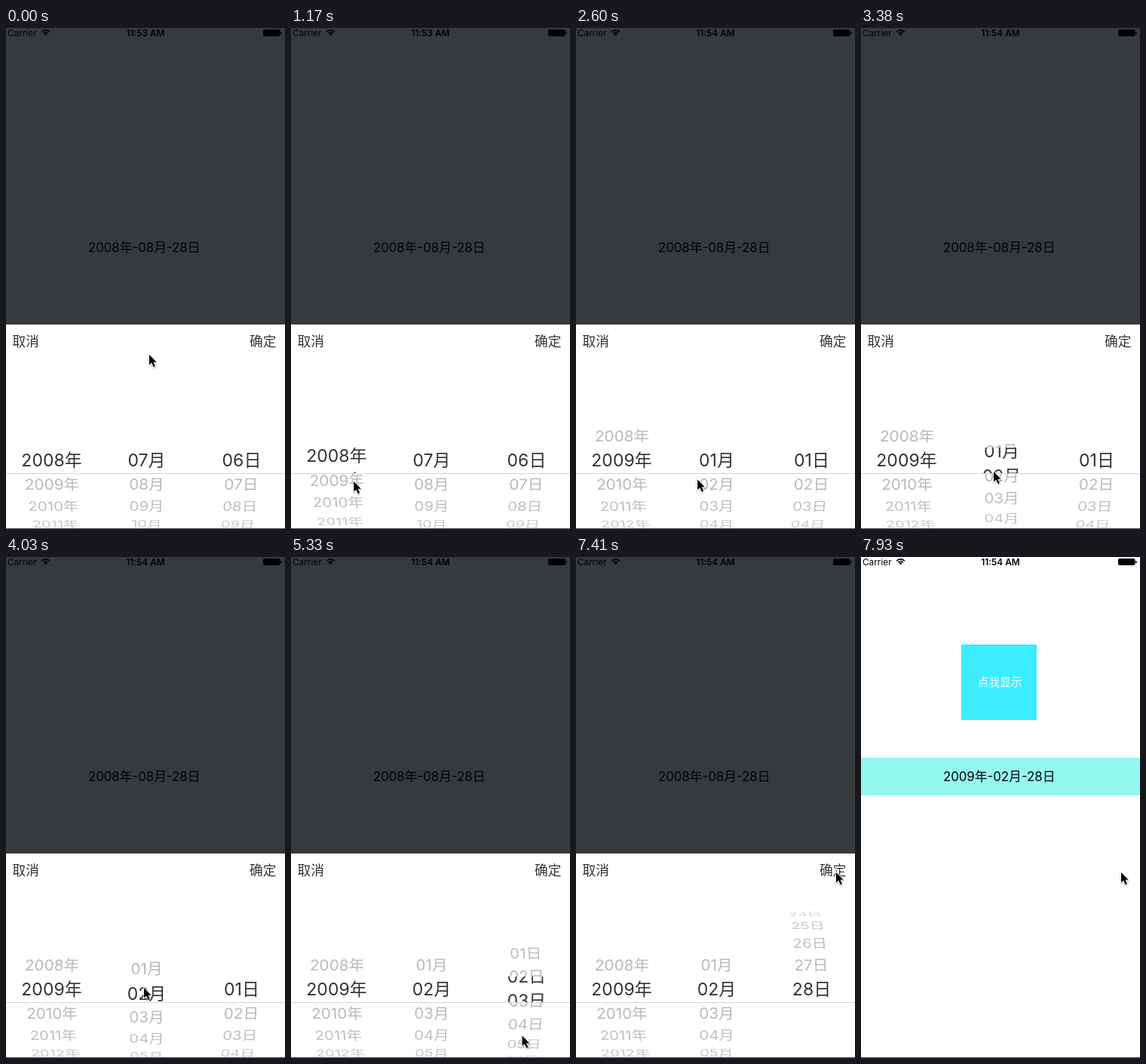
Write an HTML page with a canvas that moves like this. It is 370 px wide and 664 px high and loops after 8 s.

```html
<!DOCTYPE html>
<html lang="zh-CN">
<head>
<meta charset="utf-8">
<title>Date picker</title>
<style>
  html, body { margin: 0; width: 100%; height: 100%; overflow: hidden; background: #fff; }
  canvas { display: block; width: 370px; height: 664px; }
</style>
</head>
<body>
<canvas id="stage"></canvas>
<script>
const W = 370, H = 664, LOOP = 8000, STEP = 130;
const FONT = 'Inter, "Noto Sans CJK SC", "Noto Sans CJK", "Noto Sans CJK JP", sans-serif';
const canvas = document.getElementById('stage');
const ctx = canvas.getContext('2d');
const ratio = window.devicePixelRatio || 1;
canvas.width = W * ratio;
canvas.height = H * ratio;

// Wheel geometry: rows sit on a cylinder seen from the middle of the sheet
const MIDDLE_X = 186, CENTER_Y = 573, RADIUS = 106, ROW_ANGLE = 17.6 * Math.PI / 180;
const DEPTH = 0.1, REACH = 4.8;
const BAND_TOP = 556, BAND_HEIGHT = 34, SHEET_TOP = 393;

const RESET_AT = 2340, CLOCK_AT = 2210, CONFIRM_AT = 7800;

const pad = n => String(n).padStart(2, '0');
const smooth = u => u * u * (3 - 2 * u);

// Eased progress from 0 to 1 between two times
const progress = (t, start, end) =>
  smooth(Math.min(1, Math.max(0, (t - start) / (end - start))));

// Moves a value through successive eased legs
function glide(t, value, ...legs) {
  for (const [start, end, target] of legs) value += (target - value) * progress(t, start, end);
  return value;
}

function cursorAt(t) {
  let x = 190, y = 433;
  const moveTo = (start, end, toX, toY) => {
    x = glide(t, x, [start, end, toX]);
    y = glide(t, y, [start, end, toY]);
  };
  moveTo(0, 520, 83, 607);        // to the year wheel
  moveTo(1040, 1560, 85, 569);    // drag it up
  moveTo(2080, 2730, 170, 602);   // to the month wheel
  moveTo(2990, 3380, 176, 588);   // drag, pause, drag
  moveTo(3510, 4030, 183, 571);
  moveTo(4030, 4420, 225, 581);   // to the day wheel
  moveTo(4420, 5070, 304, 645);
  moveTo(5200, 6110, 351, 456);   // fling it
  moveTo(6110, 7410, 345, 418);   // to the confirm button
  return [x, y];
}

function wheelsAt(t) {
  const reset = t >= RESET_AT;
  return [
    { x: 60.5, unit: '年', first: 2008, last: 2030,
      pos: glide(t, 0, [1040, 1560, 1.18], [1950, 2210, 1]) },
    { x: 186.5, unit: '月', first: reset ? 1 : 7, last: 12,
      pos: glide(t, 0, [2990, 3380, 0.37], [3510, 4290, 1]) },
    { x: 312.5, unit: '日', first: reset ? 1 : 6, last: 28,
      pos: glide(t, 0, [5200, 6110, 27.68], [6110, 7020, 27]) }
  ];
}

function text(str, x, y, size, color, align = 'center', weight = 400) {
  ctx.font = `${weight} ${size}px ${FONT}`;
  ctx.textAlign = align;
  ctx.fillStyle = color;
  ctx.fillText(str, x, y + size * 0.36);
}

function rect(x, y, w, h, color) {
  ctx.fillStyle = color;
  ctx.fillRect(x, y, w, h);
}

function drawRows({ x, unit, first, last, pos }, size, color) {
  const from = Math.max(0, Math.ceil(pos - REACH));
  const to = Math.min(last - first, Math.floor(pos + REACH));
  for (let i = from; i <= to; i++) {
    const angle = (i - pos) * ROW_ANGLE;
    const sin = Math.sin(angle), cos = Math.cos(angle);
    const offset = x - MIDDLE_X;
    const shrink = 1 - DEPTH * (1 - cos);
    ctx.save();
    ctx.transform(shrink, 0, -offset * DEPTH * sin / RADIUS, cos,
                  MIDDLE_X + offset * shrink, CENTER_Y + RADIUS * sin);
    ctx.globalAlpha = 0.4 + 0.6 * cos;
    text(pad(first + i) + unit, 0, 0, size, color);
    ctx.restore();
  }
}

function drawSheet(t, slide) {
  const wheels = wheelsAt(t);
  ctx.save();
  ctx.translate(0, slide * (H - SHEET_TOP));
  rect(0, SHEET_TOP, W, H - SHEET_TOP, '#fff');
  text('取消', 8.5, 416, 17.7, '#333', 'left');
  text('确定', 358.5, 416, 17.7, '#333', 'right');
  wheels.forEach(wheel => drawRows(wheel, 20.8, '#b7b7b7'));

  // The selection band shows the same rows, larger and dark
  ctx.save();
  ctx.beginPath();
  ctx.rect(0, BAND_TOP, W, BAND_HEIGHT);
  ctx.clip();
  rect(0, BAND_TOP, W, BAND_HEIGHT, '#fff');
  wheels.forEach(wheel => drawRows(wheel, 23, '#333'));
  ctx.restore();
  rect(0, BAND_TOP + BAND_HEIGHT, W, 1, '#d2d2d2');
  ctx.restore();
}

function drawStatusBar(t) {
  text('Carrier', 2, 6.5, 11.8, '#000', 'left');
  text(t < CLOCK_AT ? '11:53 AM' : '11:54 AM', 185, 6.5, 11.8, '#000', 'center', 600);

  // Signal: a wedge under two arcs
  const wave = radius => ctx.arc(52.5, 10.3, radius, -Math.PI * 0.76, -Math.PI * 0.24);
  ctx.strokeStyle = '#000';
  ctx.lineWidth = 1.6;
  for (const radius of [4.6, 7.4]) {
    ctx.beginPath();
    wave(radius);
    ctx.stroke();
  }
  ctx.fillStyle = '#000';
  ctx.beginPath();
  ctx.moveTo(52.5, 10.3);
  wave(3);
  ctx.fill();

  // Battery
  ctx.beginPath();
  ctx.roundRect(341, 2, 22.5, 9, 2);
  ctx.roundRect(364, 5, 1.6, 3.4, 0.8);
  ctx.fill();
}

function drawCursor(x, y) {
  const arrow = new Path2D('M0 0V13.4L3.1 10.6L5.6 16.2L7.9 15.2L5.5 9.7H9.6Z');
  ctx.save();
  ctx.translate(x, y);
  ctx.shadowColor = 'rgba(0,0,0,.35)';
  ctx.shadowBlur = 2 * ratio;
  ctx.shadowOffsetY = ratio;
  ctx.strokeStyle = '#fff';
  ctx.lineWidth = 1.6;
  ctx.stroke(arrow);
  ctx.shadowColor = 'transparent';
  ctx.fillStyle = '#000';
  ctx.fill(arrow);
  ctx.restore();
}

function draw(t) {
  const dismissed = progress(t, 7670, 7930);
  ctx.setTransform(ratio, 0, 0, ratio, 0, 0);
  rect(0, 0, W, H, '#fff');
  rect(133, 116, 100, 100, '#3bedff');
  text('点我显示', 184, 166, 14.8, '#fff', 'center', 300);
  rect(0, 266, W, 50, '#94f7f2');

  ctx.globalAlpha = 1 - dismissed;
  rect(0, 0, W, H, '#353b3d');
  ctx.globalAlpha = 1;

  text(t < CONFIRM_AT ? '2008年-08月-28日' : '2009年-02月-28日', 183.2, 291, 16.8, '#000');
  drawStatusBar(t);
  if (dismissed < 1) drawSheet(t, dismissed);
  rect(0, H - 1, W, 1, '#4a4a4a');
  drawCursor(...cursorAt(t));
}

const start = performance.now();
function tick() {
  const t = (performance.now() - start) % LOOP;
  draw(Math.floor(t / STEP) * STEP);
  requestAnimationFrame(tick);
}
tick();
</script>
</body>
</html>
```
